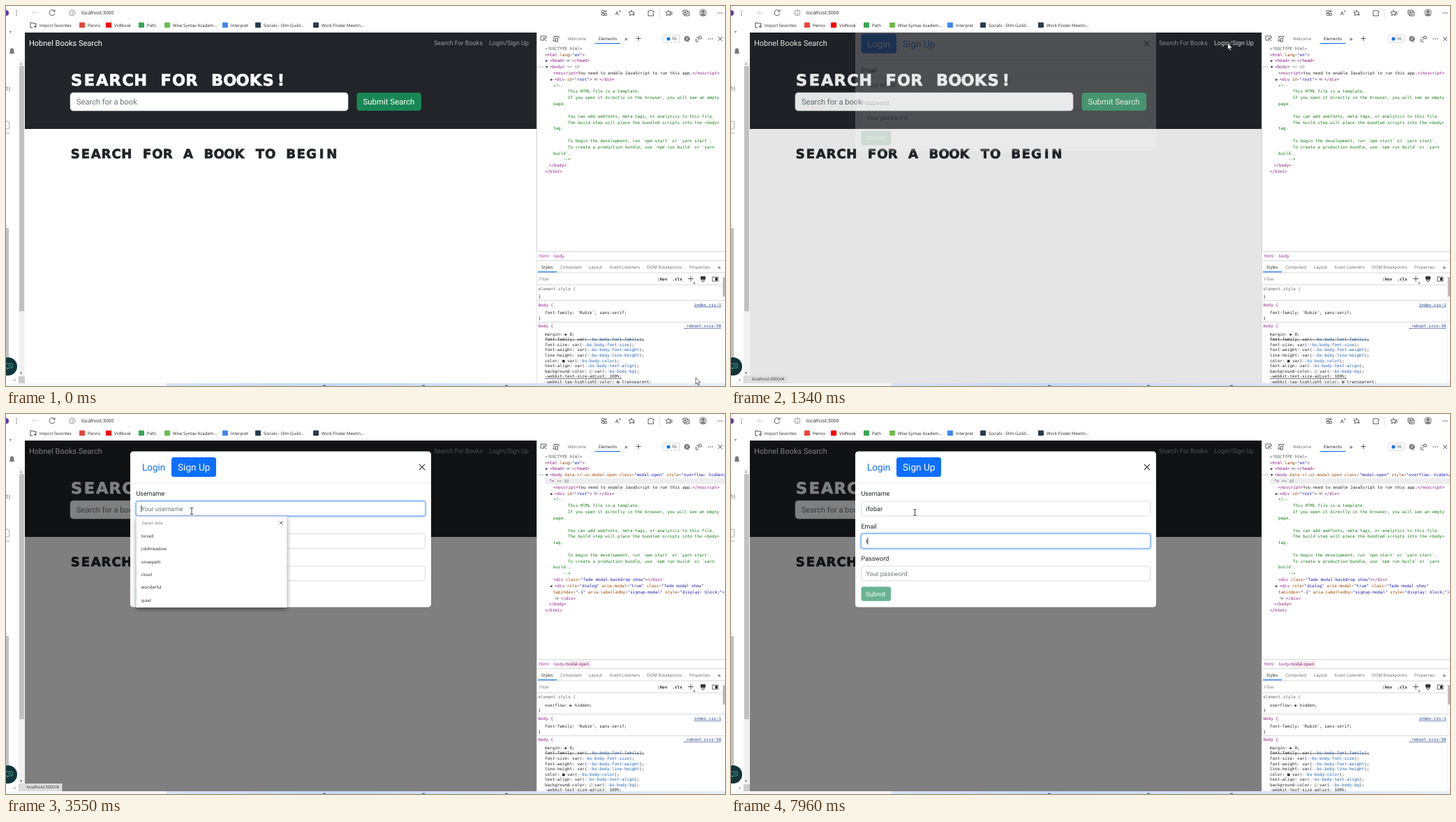
Write an HTML page that moves like this. It is 1030x544 px and loops after 8000 ms.

```html
<!DOCTYPE html>
<html lang="en">
<head>
<meta charset="utf-8">
<title>Book search sign-up</title>
<style>
html, body { margin: 0; height: 100%; overflow: hidden; background: #fff; }
svg { display: block; width: 100vw; height: 100vh; }
text { white-space: pre; text-rendering: geometricPrecision; font-family: "Open Sans", sans-serif; }
.app { font-family: Roboto, sans-serif; }
.mono { font-family: "DejaVu Sans Mono", monospace; }
.caps { font: bold 22px "DejaVu Sans", sans-serif; text-anchor: middle; stroke-width: .7; }
</style>
</head>
<body>
<svg id="stage" viewBox="0 0 1030 544"></svg>
<script>
const LOOP = 8000, CELL = 3.567, ROW = 8.82;
const esc = s => s.replace(/&/g, '&amp;').replace(/</g, '&lt;').replace(/>/g, '&gt;');
const rect = (x, y, w, h, fill, more = '') =>
  `<rect x="${x}" y="${y}" width="${w}" height="${h}" fill="${fill}" ${more}/>`;
const line = (d, stroke = '#333', more = '') =>
  `<path d="${d}" fill="none" stroke="${stroke}" stroke-width=".8" ${more}/>`;
const dot = (x, y, r, fill, more = '') => `<circle cx="${x}" cy="${y}" r="${r}" fill="${fill}" ${more}/>`;
const text = (x, y, s, size = 6.1, fill = '#222', more = '') =>
  `<text x="${x}" y="${y}" font-size="${size}" fill="${fill}" ${more}>${esc(s)}</text>`;
const app = (x, y, s, size = 9, fill = '#212529', more = '') => text(x, y, s, size, fill, `class="app" ${more}`);
const mono = (x, y, s, fill = '#222', more = '') => text(x, y, s, 5.92, fill, `class="mono" ${more}`);
const group = (id, body) => `<g id="${id}">${body}</g>`;
const caps = (x, y, s, size, step, fill) => text([...s].map((c, i) => (x + (i + .5) * step).toFixed(1)).join(' '),
  y, s, size, fill, `class="caps" style="font-size:${size}px" stroke="${fill}"`);

// Browser frame and the sliver of the neighbouring page
const bookmarks = [
  [48, 'Import favorites'], [117, 'Penno', '#ea4335'], [155, 'VidNook', '#f00'], [202, 'Path', '#34a853'],
  [239, 'Wise Syntax Academ...', '#6abf4b'], [322, 'Interpret', '#4285f4'],
  [369, 'Socials - Olm Guild...', '#2b3a4a'], [452, 'Work Finder Meetin...', '#2b3a4a']];
const star = (x, y) => line(`M${x} ${y - 4}l1.2 2.6 2.8.3-2 2 .6 2.8-2.6-1.4-2.6 1.4.6-2.8-2-2 2.8-.3z`);
const dots = (x, y, dx, dy, r = .7) => [-1, 0, 1].map(i => dot(x + i * dx, y + i * dy, r, '#333')).join('');
const chrome = () => [
  rect(0, 0, 1030, 544, '#fff'),
  dot(0, 10, 4, '#5e35b1'), dots(15, 10, 0, 3),
  line('M46 9.5H38l3.5-3.5M38 9.5l3.5 3.5', '#ccc'),
  line('M69.3 7.2A4 4 0 1 0 70 10.5M70 5v3h-3'),
  dot(95, 9.7, 3.9, 'none', 'stroke="#666" stroke-width=".7"'), line('M95 9v3M95 7v1', '#666'),
  text(108, 12, 'localhost:3000', 6.9),
  bookmarks.map(([x, s, c]) => text(x, 29.8, s) +
    (c ? rect(x - 12, 23.5, 8, 7.5, c, 'rx="1"') : line('M35 31v-7h3l1 1h4v3M35 31h3M40 29.5h4M42 27.5v4', '#222'))).join(''),
  line('M853.5 6.5h3v3h-3zM853.5 10.5h3v3h-3zM857.5 10.5h3v3h-3zM859 5.5v4M857 7.5h4', '#555'),
  text(873, 13, 'A', 7.5), text(878, 9, 'A', 4.5),
  star(896, 10), dot(899, 12, 2.4, '#fff'), line('M897 12h4M899 10v4'),
  line('M920 7h2.5q1-2.5 2.5 0h2.5v2.5q-2 1 0 2.5v2h-7.5z'),
  line('M936.5 4v12', '#ddd'), star(949, 10), line('M952 9h3M952 11.5h3'),
  line('M970 6h6v6h-6zM972 12v2h6.5v-6h-2.5M973 7v4M971 9h4'),
  dot(998.5, 9.5, 6, '#c4c4c4'), dot(998.5, 7.8, 2.1, '#777'), line('M995 13.5q3.5-4.5 7 0z', '#777', 'style="fill:#777"'),
  dots(1023, 10, 2.7, 0),
  text(5, 39, '▾', 6, '#777'),
  line('M5 67.5h7l-1.2-2v-2.5a2.3 2.3 0 0 0-4.6 0v2.5zM7.5 69h2', '#777', 'style="fill:#777"'),
  text(-1, 121, '1)', 8, '#555'), line('M0 165h3.5q1 0 1 1v9q0 1-1 1h-3.5M0 182h5', '#999'),
  rect(18.5, 78, 8, 452, '#f1f1f1'), rect(19, 86, 7, 351, '#c1c1c1'),
  text(20.3, 84, '▴', 5, '#777'), text(20.3, 527, '▾', 5, '#333'), rect(18, 530, 9, 10, '#ccc'),
  text(11.5, 537, '▸', 5, '#777'), text(-1, 315, '▴', 4, '#777'), rect(0, 318, 4, 185, '#c1c1c1'),
  dot(3, 516, 13, '#12343b'), line('M0 512h9v6h-5l-2 2v-2h-2M3 515h4', '#4fc3a1')
].join('');

// The web page itself
const page = () => [
  rect(27, 38, 733, 502, '#fff'), rect(27, 38, 733, 138, '#212529'),
  app(33, 56.7, 'Hobnel Books Search', 11, '#fff'),
  app(613, 55.7, 'Search For Books', 8.95, '#9b9d9f'),
  app(692, 55.7, 'Login/Sign Up', 9.05, '#9b9d9f', 'id="navLogin"'),
  caps(92, 114, 'SEARCH FOR BOOKS!', 22.5, 18.3, '#fff'),
  rect(92, 124, 398, 26, '#fff', 'rx="4.3" stroke="#ced4da" stroke-width=".6"'),
  app(101, 141.2, 'Search for a book', 11.1, '#6c757d'),
  rect(502.5, 124, 92.5, 26, '#198754', 'rx="4.3"'), app(511.5, 141.2, 'Submit Search', 11.4, '#fff'),
  caps(92, 217.8, 'SEARCH FOR A BOOK TO BEGIN', 18.1, 14.7, '#212529')
].join('');

// Sign-in dialog
const field = (y, label, hint, id = '') => app(186.5, y - 7.7, label) +
  rect(186.5, y, 414, 20.8, '#fff', 'rx="3" stroke="#ced4da" stroke-width=".8"') +
  app(193.5, y + 13.5, hint, 8.95, '#6c757d', id && `id="${id}Hint"`);
const submit = y => rect(186.5, y, 42.5, 20.5, '#6ab392', 'rx="3"') + app(193, y + 13.4, 'Submit', 9, '#fff');
const ring = (id, y) => group(id,
  rect(185.5, y - 1, 416, 22.8, 'none', 'rx="4" stroke="#0d6efd" stroke-opacity=".3" stroke-width="2.2"') +
  rect(186.5, y, 414, 20.8, 'none', 'rx="3" stroke="#86b7fe"'));
const saved = ['torvell', 'coldmeadow', 'snowpath', 'cloud', 'wonderful', 'quiet'];
const dialog = () => group('modal', [
  rect(178, 53.5, 431, 176.5, '#fff', 'id="sheet" rx="4.3"'),
  line('M178 99H609', '#dee2e6'), line('M592 72l8 8M600 72l-8 8', '#444', 'style="stroke-width:1.2"'),
  rect(186.5, 62, 50.5, 28, '#0d6efd', 'id="pill" rx="3.5"'),
  app(195, 80.7, 'Login', 13.45, '#fff', 'id="tabLogin"'), app(246, 80.7, 'Sign Up', 13.6, '#0d6efd', 'id="tabSign"'),
  group('login', field(125, 'Email', 'Your email') + field(171.5, 'Password', 'Your password') + submit(201)),
  group('signup', field(125, 'Username', 'Your username', 'user') + field(171.5, 'Email', 'Your email', 'mail') +
    field(218, 'Password', 'Your password') + submit(247.3) + ring('userRing', 125) + ring('mailRing', 171.5) +
    app(193.5, 138.5, '', 9, '#212529', 'id="userText"') + app(193.5, 185, '', 9, '#212529', 'id="mailText"') +
    rect(0, 0, .8, 9.5, '#111', 'id="caret"'))
].join('')) + group('menu',
  rect(186.5, 146.5, 216, 130.5, '#fff', 'rx="1" style="filter:drop-shadow(0 2px 3px #0007)"') +
  text(194.5, 157.8, 'Saved data', 5.9, '#777') + line('M392 153.5l4.5 4.5M396.5 153.5l-4.5 4.5', '#222') +
  saved.map((s, i) => text(193.5, 176.7 + i * 18.4, s)).join(''));

// Developer tools
const rowY = r => 62.7 + r * ROW;
const paint = (fill, s) => `<tspan fill="${fill}">${esc(s)}</tspan>`;
const markup = s => s.replace(/<\/?\w*|>|"[^"<>]*"?|[\w-]+(?==")|data[\w-]+|[\w-]+|\$0|./g, (w, at) =>
  /^[<>]/.test(w) ? paint('#881280', w) : w[0] === '"' ? paint('#1a1aa6', w) :
  /^data-/.test(w) || s[at + w.length] === '=' && /\w/.test(w) ? paint('#994500', w) : /^(\$0|=)$/.test(w) ? paint('#888', w) : esc(w));
const code = (x, r, s, arrow) => {
  const gap = s.indexOf('⋯');
  return (gap < 0 ? '' : rect(x + (gap - .5) * CELL, rowY(r) - 4.5, 2 * CELL, 5, '#e2e2e2', 'rx="2"')) +
    (arrow ? text(x - 6, rowY(r), arrow, 5.5, '#333', 'class="mono"') : '') +
    `<text class="mono" font-size="5.92" fill="#222" x="${x}" y="${rowY(r)}">${markup(s)}</text>`;
};
const note = `<!--
  This HTML file is a template.
  If you open it directly in the browser, you will see an empty
page.

  You can add webfonts, meta tags, or analytics to this file.
  The build step will place the bundled scripts into the <body>
tag.

  To begin the development, run \`npm start\` or \`yarn start\`.
  To create a production bundle, use \`npm run build\` or \`yarn
build\`.
    -->`.split('\n');
const content = r => code(784, r, '<noscript>You need to enable JavaScript to run this app.</noscript>') +
  code(786, r + 1, '<div id="root"> ⋯ </div>', '▶') +
  note.map((s, i) => mono(s.startsWith('    ') ? 798 : s[0] === ' ' ? 805 : 784, rowY(r + 2 + i), s.trim(), '#147a14')).join('');
const mark = (x, r, n) => rect(x, rowY(r) - 6, n * CELL, 8, '#9c6b90');
const closing = r => code(778, r, '</body>') + code(772, r + 1, '</html>');
const tree = () => code(772, 1, '<html lang="en">') + mono(772, rowY(0), '<!DOCTYPE html>', '#555') +
  code(779, 2, '<head> ⋯ </head>', '▶') + dots(766, 87, 2.8, 0, .6) +
  group('treeClosed', code(779, 3, '<body> == $0', '▼') + content(4) + closing(19)) +
  group('treeOpen', rect(772, 91.8, 258, 8.4, '#ededed') +
    group('marks', mark(800.4, 3, 21) + mark(903.8, 3, 10) + mark(971.6, 3, 17) + mark(826.8, 20, 24) + mark(942, 21, 15)) +
    code(779, 3, '<body data-rr-ui-modal-open class="modal-open" style="overflow: hidden;', '▼') +
    code(778, 4, '"> == $0') + content(5) +
    code(784, 20, '<div class="fade modal-backdrop show"></div>') +
    code(786, 21, '<div role="dialog" aria-modal="true" class="fade modal show"', '▶') +
    code(784, 22, 'tabindex="-1" aria-labelledby="signup-modal" style="display: block;">') +
    code(784, 23, ' ⋯ </div>') + closing(24));

const rule = y => line(`M760.5 ${y}H1030`, '#ccc');
const css = (y, s, more) => `<text class="mono" font-size="5.92" fill="#222" x="772" y="${y}" ${more || ''}>` +
  esc(s).replace(/--[\w-]+/g, v => paint('#1a5fb4', v)) + '</text>';
const link = (y, s) => mono(1024.5, y, s, '#1a3a8a', 'text-anchor="end" text-decoration="underline"');
const props = ['margin: ▶ 0;', 'font-family: var(--bs-body-font-family);', 'font-size: var(--bs-body-font-size);',
  'font-weight: var(--bs-body-font-weight);', 'line-height: var(--bs-body-line-height);', 'color: ■ var(--bs-body-color);',
  'text-align: var(--bs-body-text-align);', 'background-color: □ var(--bs-body-bg);',
  '-webkit-text-size-adjust: 100%;', '-webkit-tap-highlight-color: ▨ transparent;'];
const styles = () => mono(762.5, 407.2, 'element.style {', '#666') +
  group('overflow', css(418.7, 'overflow: ▶ hidden;')) +
  group('rules', mono(762.5, 417.8, '}') + rule(421.5) +
    mono(762.5, 429.7, 'body {', '#881280') + link(429.7, 'index.css:1') + css(440.7, "font-family: 'Rubik', sans-serif;") +
    mono(762.5, 448.7, '}') + rule(452.5) + mono(762.5, 460, 'body {', '#881280') + link(460, '_reboot.scss:50') +
    props.map((s, i) => css(471.7 + i * 7.57, s, i === 1 ? 'text-decoration="line-through"' :
      i === 8 ? 'style="text-decoration:underline wavy #c33 .5px"' : '')).join(''));
const panelTabs = [[794, 'Computed'], [835, 'Layout'], [865, 'Event Listeners'], [918, 'DOM Breakpoints'], [979, 'Properties']];
const tools = () => [
  rect(760, 38, 270, 502, '#fff'), line('M760.4 38V540', '#bbb'),
  line('M769 49h-3v-6h8v3M770 46l4 4M770 46v4M770 46h4'), line('M785 43.5h7v2M785 43.5v6M783 50h4M787.5 46h3v5h-3z'),
  text(805, 49, 'Welcome', 6.1, '#666'), text(849, 49, 'Elements'), rect(844, 53, 36, 1.2, '#1a73e8'),
  text(886, 49.5, '»', 9), line('M902.5 46.5h7M906 43v7'),
  rect(942, 41.5, 22.5, 10.5, '#fff', 'rx="1" stroke="#ccc" stroke-width=".7"'), dot(949, 47, 2.6, '#1a73e8'), text(953.5, 49.2, '10'),
  dot(975.5, 47, 3.2, 'none', 'stroke="#333" stroke-width="1.6" stroke-dasharray="1.7 .8"'),
  dot(975.5, 47, 2.4, '#fff', 'stroke="#333" stroke-width=".7"'), dot(975.5, 47, 1, '#333'),
  dot(994.5, 45, 2, 'none', 'stroke="#333" stroke-width=".8"'), line('M993 46.5l-2.5 2.5M988.5 47v4h4M989 45h3'),
  dots(1009, 47, 2.9, 0), line('M1020 44l6 6M1026 44l-6 6'),
  tree(), rect(760.5, 351, 270, 189, '#fff'), rule(351.5),
  rect(803, 353, 35, 10.5, '#f4ecec', 'id="crumbMark"'),
  text(764, 360.2, 'html', 6.1, '#881280'), text(785, 360.2, 'body', 6.1, '#881280', 'id="crumb"'), rule(364.5),
  text(767, 376, 'Styles'), rect(762, 380, 27, 1.3, '#1a73e8'),
  panelTabs.map(([x, s]) => text(x, 376, s, 6.1, '#666')).join(''), text(1019.5, 376.5, '»', 9),
  rule(382), text(764, 393.2, 'Filter', 6.1, '#777'),
  mono(933, 393, ':hov', '#222', 'font-weight="bold"'), mono(954.5, 393, '.cls', '#222', 'font-weight="bold"'),
  line('M977 390.5h8M981 386.5v8'), text(984.5, 396.5, '◢', 3),
  rect(995, 387, 7, 4.5, '#333'), line('M996 392h5l-2 3h-1z'), line('M1012 388h8v6h-8z'), rect(1016, 389, 3, 4, '#222'),
  rule(399), styles(), rect(1027, 388, 3, 28, '#bbb', 'rx="1"'), line('M1026.5 383V540', '#eee')
].join('');

const status = () => group('status', rect(19, 529, 61.5, 11, '#dcdcdc') + text(29.5, 536.4, 'localhost:3000/#', 6, '#333'));
const taskbar = () => rect(0, 540, 1030, 4, '#f5f7fa') + rect(230, 540, 800, 4, 'url(#sky)') +
  [456, 598, 717].map(x => rect(x - 2, 542.8, 4, 1.2, '#557')).join('');
const solid = d => `<path d="${d}" fill="#fff" stroke="#000" stroke-width=".6"/>`;
const pointers = () => group('pointer',
  group('arrow', solid('M0 0V9.5L2.2 7.5 3.8 11 5.3 10.3 3.8 6.9H6.8Z')) +
  group('hand', solid('M-1 .8Q0-.6 1 .8V4L5.5 5Q6.5 5.3 6.3 7L5.5 11H-.5L-3.2 7.3Q-3.5 6-2.4 6.2L-1 7.3Z')) +
  group('beam', line('M-2.2-4.5H-.6L0-4 .6-4.5H2.2M0-4V4M-2.2 4.5H-.6L0 4 .6 4.5H2.2', '#111')));

stage.innerHTML = '<defs><linearGradient id="sky"><stop stop-color="#d3e3f8"/><stop offset=".3" stop-color="#c3daf5"/>' +
  '<stop offset="1" stop-color="#e6eefa"/></linearGradient></defs>' +
  chrome() + page() + group('backdrop', rect(27, 38, 733, 502, '#000')) + dialog() + tools() + status() + taskbar() + pointers();

const $ = id => document.getElementById(id);
const set = (id, name, value) => $(id).setAttribute(name, value);
const show = (id, amount) => set(id, 'opacity', +amount);
const move = (id, x, y) => set(id, 'transform', `matrix(1 0 0 1 ${x} ${y})`);
const ramp = (t, start, span) => Math.min(1, Math.max(0, (t - start) / span));
const easeOut = p => 1 - (1 - p) ** 1.8;
const between = (t, a, b) => t >= a && t < b;

const OPEN = 1310, INSPECT = 1600, SWITCH = 2550, FOCUS = 3490, NEXT = 7490;
const name = 'ifobar', nameKeys = [5160, 5430, 5700, 5900, 6160, 6490], mailKey = 7960;
const track = [[70, 988, 532], [750, 706, 55], [880, 698.5, 52], [1150, 711.5, 53], [1400, 711.5, 53], [1700, 560, 74],
  [2150, 312.5, 87], [2490, 270, 75], [2850, 270, 75], [3350, 266, 139], [4299, 266, 139], [4300, 263.5, 141]];

function place(t) {
  const i = track.findIndex(k => k[0] > t);
  if (i < 1) return track.at(i).slice(1);
  const [a, b] = [track[i - 1], track[i]], p = ramp(t, a[0], b[0] - a[0]), e = p * p * (3 - 2 * p);
  return [a[1] + (b[1] - a[1]) * e, a[2] + (b[2] - a[2]) * e];
}

function draw(t) {
  const signing = t >= SWITCH, grown = t >= SWITCH + 150, inspected = t >= INSPECT;
  show('backdrop', .5 * ramp(t, OPEN, 150));
  show('modal', ramp(t, OPEN, 150));
  move('modal', 0, -27 * (1 - easeOut(ramp(t, OPEN, 300))));
  set('navLogin', 'fill', between(t, 800, 1500) ? '#e6e6e7' : '#9b9d9f');
  set('sheet', 'height', grown ? 223 : 176.5);
  set('pill', 'x', signing ? 237 : 186.5);
  set('pill', 'width', signing ? 64 : 50.5);
  set('tabLogin', 'fill', signing ? '#0d6efd' : '#fff');
  set('tabSign', 'fill', signing ? '#fff' : '#0d6efd');
  show('login', 1 - ramp(t, SWITCH, 150));
  show('signup', ramp(t, SWITCH + 150, 150));

  show('treeClosed', !inspected);
  show('treeOpen', inspected);
  show('marks', 1 - ramp(t, SWITCH, 400));
  show('overflow', inspected);
  show('crumbMark', inspected);
  $('crumb').textContent = inspected ? 'body.modal-open' : 'body';
  move('rules', 0, inspected ? 8.2 : 0);
  show('status', t < 2200 ? ramp(t, 820, 140) - ramp(t, 1600, 250) : ramp(t, 2400, 150) - ramp(t, 3850, 240));

  const typed = name.slice(0, nameKeys.filter(k => t >= k).length), mail = t >= mailKey ? 'i' : '';
  $('userText').textContent = typed;
  $('mailText').textContent = mail;
  show('userHint', !typed);
  show('mailHint', !mail);
  show('menu', between(t, FOCUS, nameKeys[0]));
  show('userRing', ramp(t, FOCUS - 70, 120) - ramp(t, NEXT, 150));
  show('mailRing', ramp(t, NEXT, 150));
  const onMail = t >= NEXT, last = Math.max(...[FOCUS + 10, ...nameKeys, NEXT, mailKey].filter(k => k <= t));
  show('caret', t >= FOCUS + 10 && Math.floor((t - last) / 530) % 2 === 0);
  set('caret', 'x', 193.4 + $(onMail ? 'mailText' : 'userText').getComputedTextLength());
  set('caret', 'y', onMail ? 177.2 : 130.7);

  const hand = between(t, 740, 1250) || between(t, 2420, 2920), beam = t >= 3300;
  move('pointer', ...place(t));
  show('hand', hand);
  show('beam', beam);
  show('arrow', !hand && !beam);
}

function tick() {
  draw(performance.now() % LOOP);
  requestAnimationFrame(tick);
}
tick();
</script>
</body>
</html>
```
